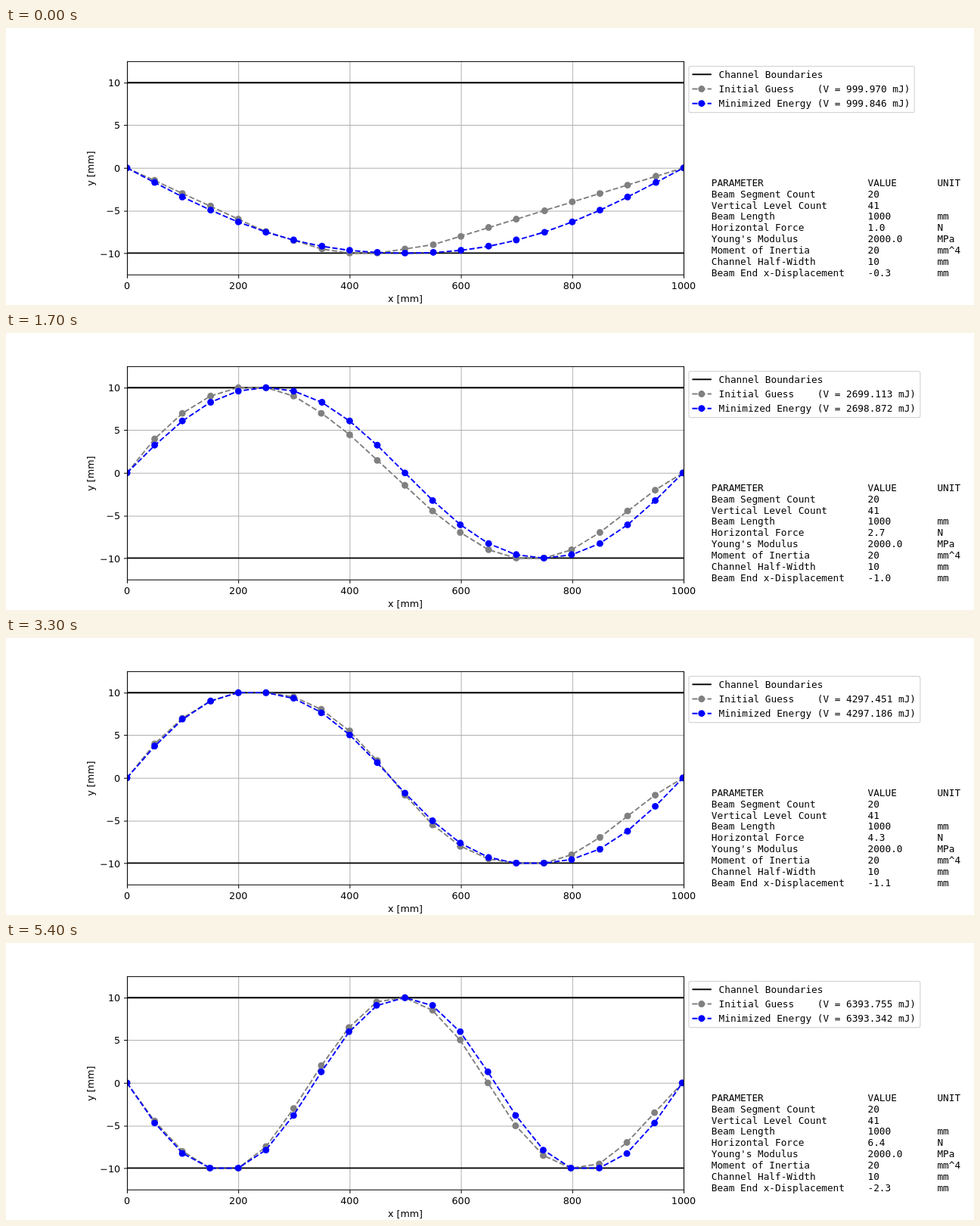
An HTML page that plays this animation: 1280x366 px, repeating every 5.5 s.

```html
<!DOCTYPE html>
<html lang="en">
<head>
<meta charset="utf-8">
<title>Buckling beam in a channel</title>
<style>
html, body { margin: 0; width: 100%; height: 100%; overflow: hidden; background: #fff; }
svg { display: block; }
text { font: 12.7px "DejaVu Sans", sans-serif; white-space: pre; }
.mono text { font: 12.72px "DejaVu Sans Mono", monospace; }
.thin { stroke-width: 1.016; fill: none; }
.line { stroke-width: 1.905; fill: none; stroke-linejoin: round; }
.dash { stroke-dasharray: 7.05 3.05; }
</style>
</head>
<body>
<svg id="stage" width="1280" height="366" viewBox="0 0 1280 366">
  <clipPath id="clip"><rect x="160" y="43.92" width="736" height="281.82"/></clipPath>
</svg>
<script>
const N = 20, LEVELS = 41, MID = 20, H = 50, EI = 40000, HALF = 10, STEP = 0.5;
const FRAMES = 55, FRAME_MS = 100;

// ---- Beam model: rigid segments of length H joined by rotational springs ----
const D = LEVELS - 1;
const angle = [], run = [];
for (let d = -D; d <= D; d++) {
  angle[d + D] = Math.asin(d * STEP / H);
  run[d + D] = H * Math.cos(angle[d + D]);
}

const angles = y => Array.from({ length: N }, (_, i) => Math.asin((y[i + 1] - y[i]) / H));

function describe(y, force) {
  const x = [0];
  let bend = 0;
  const th = angles(y);
  th.forEach((t, i) => {
    x.push(x[i] + H * Math.cos(t));
    if (i) bend += EI / (2 * H) * (t - th[i - 1]) ** 2;
  });
  return { x, y, energy: bend + force * x[N] };
}

// Dynamic programming over pairs of neighbouring levels
function guess(force) {
  let value = new Float64Array(LEVELS * LEVELS).fill(Infinity);
  value.fill(0, MID * LEVELS, (MID + 1) * LEVELS);
  const back = [];
  for (let i = 1; i < N; i++) {
    const next = new Float64Array(LEVELS * LEVELS);
    const from = back[i] = new Uint8Array(LEVELS * LEVELS);
    for (let b = 0; b < LEVELS; b++) {
      for (let c = 0; c < LEVELS; c++) {
        const out = angle[c - b + D];
        let best = Infinity, arg = 0;
        for (let a = 0; a < LEVELS; a++) {
          const turn = out - angle[b - a + D];
          const cost = value[a * LEVELS + b] + force * run[b - a + D] + EI / (2 * H) * turn * turn;
          if (cost < best - 1e-9) { best = cost; arg = a; }
        }
        next[b * LEVELS + c] = best;
        from[b * LEVELS + c] = arg;
      }
    }
    value = next;
  }
  const path = [];
  path[N] = MID;
  let best = Infinity;
  for (let b = 0; b < LEVELS; b++) {
    const cost = value[b * LEVELS + MID];
    if (cost < best - 1e-9) { best = cost; path[N - 1] = b; }
  }
  for (let i = N - 1; i > 0; i--) path[i - 1] = back[i][path[i] * LEVELS + path[i + 1]];
  return path.map(p => p * STEP - HALF);
}

// Projected successive over-relaxation between the channel walls
function relax(start, force) {
  const y = start.slice(), th = angles(y);
  const stiff = 6 * EI / H ** 3 - 2 * force / H;
  const torque = j => {
    let t = -force * H * Math.sin(th[j]);
    if (j > 0) t += EI / H * (th[j] - th[j - 1]);
    if (j < N - 1) t -= EI / H * (th[j + 1] - th[j]);
    return t / (H * Math.cos(th[j]));
  };
  for (let sweep = 0; sweep < 4000; sweep++) {
    let moved = 0;
    for (let i = 1; i < N; i++) {
      const old = y[i];
      const to = old - 1.7 * (torque(i - 1) - torque(i)) / stiff;
      y[i] = Math.max(-HALF, Math.min(HALF, to));
      moved = Math.max(moved, Math.abs(y[i] - old));
      th[i - 1] = Math.asin((y[i] - y[i - 1]) / H);
      th[i] = Math.asin((y[i + 1] - y[i]) / H);
    }
    if (moved < 1e-7) break;
  }
  return y;
}

const cache = [];
function solve(n) {
  if (!cache[n]) {
    const force = 1 + n / 10, first = guess(force);
    cache[n] = {
      force,
      initial: describe(first, force),
      minimal: describe(relax(first, force), force)
    };
  }
  return cache[n];
}

// ---- Drawing ----
const stage = document.getElementById("stage");
const px = x => 160 + 0.736 * x;
const py = y => 184.83 - 11.273 * y;

// Straight lines and markers sit on a 1400 x 400 grid, thin lines on its half steps
const snapX = (x, shift = 0) => (Math.round(x * 1400 / 1280) + shift) * 1280 / 1400;
const snapY = (y, shift = 0) => (Math.round(y * 400 / 366) + shift) * 366 / 400;
const [left, right] = [160, 896].map(x => snapX(x, 0.5));
const [top_, bottom] = [43.92, 325.74].map(y => snapY(y, 0.5));

function add(parent, tag, attrs = {}, text = "") {
  const el = document.createElementNS("http://www.w3.org/2000/svg", tag);
  for (const k in attrs) el.setAttribute(k, attrs[k]);
  el.textContent = text;
  return parent.appendChild(el);
}
const label = (parent, x, y, text, anchor = "start") =>
  add(parent, "text", { x, y, "text-anchor": anchor }, text);
const stroke = (parent, d, color, cls) =>
  add(parent, "path", { d, stroke: color, class: cls });
const dot = (parent, cx, cy, color) =>
  add(parent, "circle", { cx, cy, r: 4.44, fill: color });

const plot = add(stage, "g", { "clip-path": "url(#clip)" });
for (let x = 0; x <= 1000; x += 200) {
  const gx = snapX(px(x), 0.5);
  stroke(plot, `M${gx} ${top_}V${bottom}`, "#b0b0b0", "thin");
  stroke(stage, `M${gx} ${bottom}v4.45`, "#000", "thin");
  label(stage, px(x), 344.7, x, "middle");
}
for (let y = -10; y <= 10; y += 5) {
  const gy = snapY(py(y), 0.5);
  stroke(plot, `M${left} ${gy}H${right}`, "#b0b0b0", "thin");
  stroke(stage, `M${left} ${gy}h-4.45`, "#000", "thin");
  label(stage, 151.1, py(y) + 5, String(y).replace("-", "\u2212"), "end");
}
for (const y of [HALF, -HALF]) stroke(plot, `M159 ${snapY(py(y))}H897`, "#000", "line");

function makeCurve(color) {
  const line = stroke(plot, "", color, "line dash");
  const dots = Array.from({ length: N + 1 }, () => dot(plot, 0, 0, color));
  return ({ x, y }) => {
    line.setAttribute("d", "M" + x.map((v, i) => `${px(v)} ${py(y[i])}`).join("L"));
    dots.forEach((c, i) => {
      c.setAttribute("cx", snapX(px(x[i])));
      c.setAttribute("cy", snapY(py(y[i])));
    });
  };
}
const drawInitial = makeCurve("#808080");
const drawMinimal = makeCurve("#00f");

add(stage, "rect", {
  x: left, y: top_, width: right - left, height: bottom - top_, stroke: "#000", class: "thin"
});
label(stage, 528, 362, "x [mm]", "middle");
add(stage, "text", { transform: "translate(115.8 185.6) rotate(-90)", "text-anchor": "middle" }, "y [mm]");

const side = add(stage, "g", { class: "mono" });
const frame = add(side, "rect", {
  x: 902.9, y: 50.7, height: 61, rx: 2.5, fill: "#fff", stroke: "#ccc", "stroke-width": 1.2, "stroke-opacity": 0.8
});
const legend = ["#000", "#808080", "#00f"].map((color, i) => {
  const y = snapY(61.5 + 19 * i);
  stroke(side, `M907.4 ${y}h25.4`, color, i ? "line dash" : "line");
  if (i) dot(side, snapX(920.1), y, color);
  return label(side, 942.6, 66 + 19 * i, "Channel Boundaries");
});
const rows = Array.from({ length: 9 }, (_, i) => label(side, 932.8, 208.8 + 14.87 * i, ""));

function draw(n) {
  const { force, initial, minimal } = solve(n);
  drawInitial(initial);
  drawMinimal(minimal);
  const energy = s => `(V = ${s.energy.toFixed(3)} mJ)`;
  legend[1].textContent = "Initial Guess    " + energy(initial);
  legend[2].textContent = "Minimized Energy " + energy(minimal);
  frame.setAttribute("width", 45.5 + 7.66 * legend[2].textContent.length);
  [
    ["PARAMETER", "VALUE", "UNIT"],
    ["Beam Segment Count", "20", ""],
    ["Vertical Level Count", "41", ""],
    ["Beam Length", "1000", "mm"],
    ["Horizontal Force", force.toFixed(1), "N"],
    ["Young's Modulus", "2000.0", "MPa"],
    ["Moment of Inertia", "20", "mm^4"],
    ["Channel Half-Width", "10", "mm"],
    ["Beam End x-Displacement", (minimal.x[N] - 1000).toFixed(1), "mm"]
  ].forEach(([name, value, unit], i) => {
    rows[i].textContent = name.padEnd(27) + value.padEnd(12) + unit;
  });
}

let shown = 0;
draw(0);
const start = performance.now();
function tick() {
  const n = Math.floor((performance.now() - start) / FRAME_MS) % FRAMES;
  if (n !== shown) draw(shown = n);
  requestAnimationFrame(tick);
}
requestAnimationFrame(tick);
</script>
</body>
</html>
```
